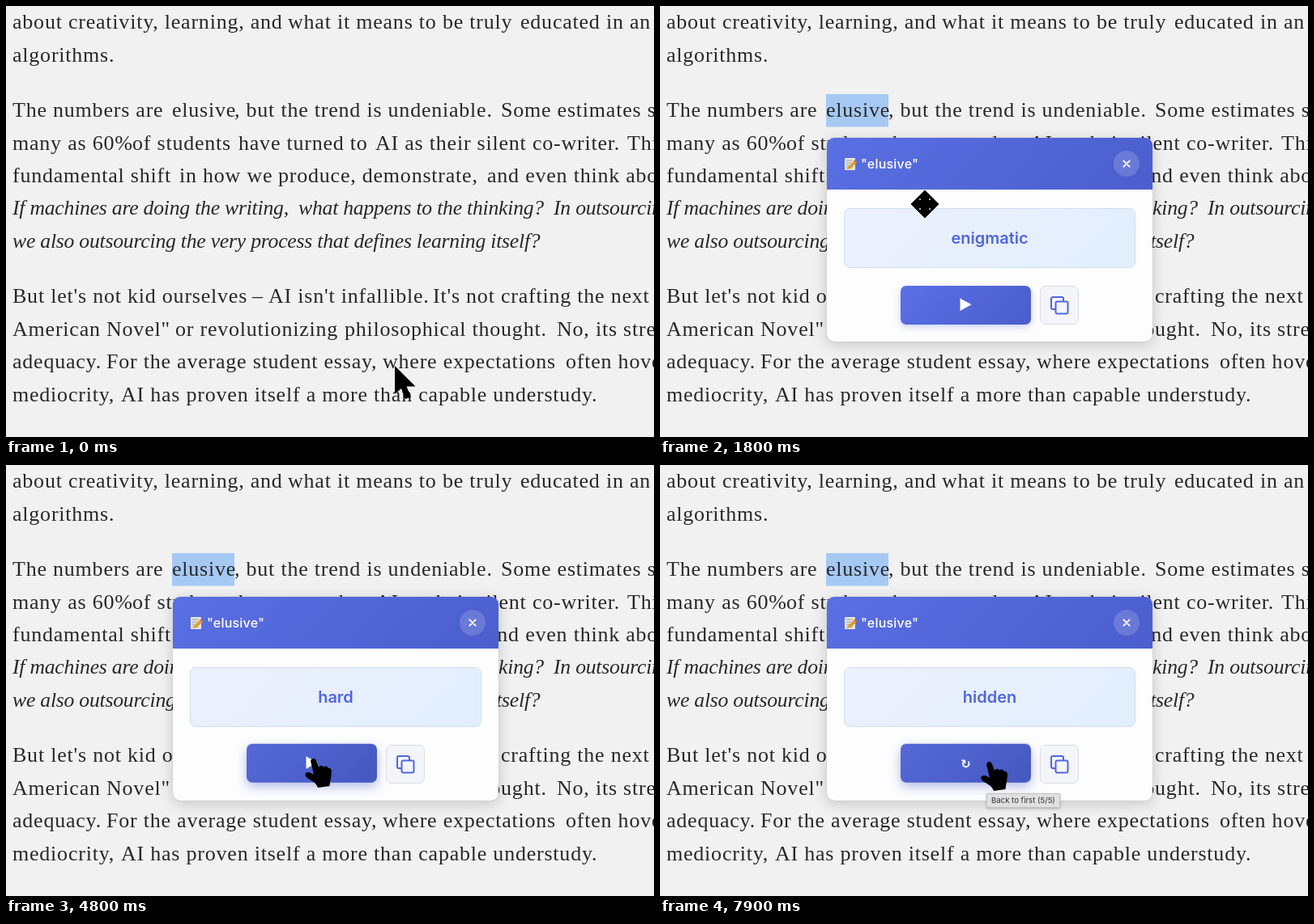
An HTML page for the animation above (8000 ms loop, 800 by 533 pixels).

```html
<!DOCTYPE html>
<html lang="en">
<head>
<meta charset="utf-8">
<title>Word helper</title>
<style>
  html, body { margin: 0; width: 100%; height: 100%; overflow: hidden; background: #f1f1f1; }
  .stage { position: relative; width: 800px; height: 533px; overflow: hidden; }
  .stage *, .stage *::before { animation: 8s step-end -20ms infinite; box-sizing: border-box; }
  .stage div, .stage svg { position: absolute; }

  /* Article */
  .page { left: 0; top: 0; font: 26px "Liberation Serif", "Times New Roman", serif;
    letter-spacing: .78px; fill: #282828; }
  .page .it { font-style: italic; font-size: 25.7px; letter-spacing: -.23px; }
  .mark { fill: #a6c9f4; animation-name: mark; }
  @keyframes mark { 0% { opacity: 0 } 10%, 100% { opacity: 1 } }

  /* Popup */
  .pop { left: 206px; top: 163px; width: 402px; height: 252px; border-radius: 9px; background: #fdfdfd;
    box-shadow: 0 0 1px rgba(0,0,0,.4), 0 4px 18px rgba(0,0,0,.18);
    font-family: Inter, "Liberation Sans", sans-serif; animation-name: pop; }
  @keyframes pop {
    0% { opacity: 0; transform: translateY(12px) }
    11.25% { opacity: .25; transform: translateY(9px) }
    12.5% { opacity: .65; transform: translateY(5px) }
    13.75% { opacity: .92; transform: translateY(1px) }
    15%, 100% { opacity: 1; transform: none }
  }
  .head { left: 0; top: 0; width: 402px; height: 64px; border-radius: 9px 9px 0 0;
    background: linear-gradient(135deg, #596fe3, #4c5ecd); }
  .title { left: 42px; top: 20px; font: 500 16px/24px Inter, "Liberation Sans", sans-serif;
    letter-spacing: .2px; color: #fff; white-space: nowrap; }
  .note { left: 21px; top: 24px; }
  .close { left: 354px; top: 16px; width: 32px; height: 32px; border-radius: 50%; background: rgba(255,255,255,.16); }
  .result { left: 21px; top: 87px; width: 360px; height: 74px; border: 1px solid #cfdef3; border-radius: 7px;
    background: linear-gradient(135deg, #ecf0fd, #e2eefc); overflow: hidden; }
  .words { left: 0; top: 0; width: 358px; text-align: center; color: #5166dc;
    font: 600 20px/72px Inter, "Liberation Sans", sans-serif; animation-name: words; }
  .words p { margin: 0; height: 72px; }
  @keyframes words {
    0% { transform: none }
    37.5% { transform: translateY(-72px) }
    58.75% { transform: translateY(-144px) }
    73.75% { transform: translateY(-216px) }
    82.5%, 100% { transform: translateY(-288px) }
  }

  /* Buttons */
  .go { left: 91px; top: 183px; width: 161px; height: 48px; animation-name: lift; }
  .go::before { content: ""; position: absolute; inset: 0; border-radius: 7px;
    background: linear-gradient(135deg, #5a70e5, #4b5dcc);
    box-shadow: 0 3px 8px rgba(84,104,220,.28); animation-name: glow; }
  @keyframes lift { 0% { transform: none } 25%, 100% { transform: translateY(-1.3px) } }
  @keyframes glow {
    0% { filter: none }
    25%, 100% { filter: brightness(.94); box-shadow: 0 5px 14px rgba(84,104,220,.42) }
  }
  .play { left: 73px; top: 15px; animation-name: play; }
  .again { left: 0; top: 1px; width: 161px; text-align: center; color: #fff;
    font: bold 15px/48px "DejaVu Sans", sans-serif; animation-name: again; }
  @keyframes play { 0% { opacity: 1 } 82.5%, 100% { opacity: 0 } }
  @keyframes again { 0% { opacity: 0 } 82.5%, 100% { opacity: 1 } }
  .copy { left: 263px; top: 183px; width: 48px; height: 48px; border: 1px solid #dadce3;
    border-radius: 7px; background: #f4f5f9; }

  /* Tooltips */
  .tip { height: 18px; padding: 0 5px; border: 1px solid #c4c4c4; background: #e0e0e0; color: #333;
    font: 9.6px/16px Inter, "Liberation Sans", sans-serif; white-space: nowrap;
    box-shadow: 0 1px 3px rgba(0,0,0,.25); }
  .t2, .t3 { left: 376px; top: 402px; }
  .t2 { animation-name: t2; }
  .t3 { animation-name: t3; }
  .t5 { left: 403px; top: 406px; animation-name: t5; }
  @keyframes t2 { 0% { opacity: 0 } 47.5% { opacity: 1 } 58.75%, 100% { opacity: 0 } }
  @keyframes t3 { 0% { opacity: 0 } 68.75% { opacity: 1 } 73.75%, 100% { opacity: 0 } }
  @keyframes t5 { 0% { opacity: 0 } 88.75%, 100% { opacity: 1 } }

  /* Pointer */
  .stage .pointer { left: 0; top: 0; overflow: visible; animation-name: travel; }
  @keyframes travel {
    0% { transform: translate(480px, 445px); animation-timing-function: steps(5) }
    6.25%, 20% { transform: translate(258px, 132px) }
    21.25% { transform: translate(288px, 190px) }
    22.5% { transform: translate(327px, 245px) }
    23.75% { transform: translate(342px, 300px) }
    25% { transform: translate(346px, 336px) }
    26.25% { transform: translate(350px, 352px) }
    33.75% { transform: translate(350px, 352px); animation-timing-function: steps(3) }
    37.5% { transform: translate(369px, 363px) }
    80% { transform: translate(369px, 363px); animation-timing-function: steps(4) }
    85%, 100% { transform: translate(396px, 367px) }
  }
  .arrow { animation-name: arrow; }
  .move { animation-name: move; }
  .hand { animation-name: hand; }
  @keyframes arrow { 0% { opacity: 1 } 21.25%, 100% { opacity: 0 } }
  @keyframes move { 0% { opacity: 0 } 21.25% { opacity: 1 } 25%, 100% { opacity: 0 } }
  @keyframes hand { 0% { opacity: 0 } 25%, 100% { opacity: 1 } }
</style>
</head>
<body>
<div class="stage">
  <svg class="page" width="800" height="533">
    <rect class="mark" x="205" y="109" width="77" height="40.5"/>
    <text y="28"><tspan x="8">about creativity, learning, and</tspan> <tspan x="348">what it means to be truly</tspan> <tspan x="635">educated in an</tspan></text>
    <text y="69" x="8">algorithms.</text>
    <text y="137"><tspan x="8">The numbers are</tspan> <tspan x="205">elusive</tspan><tspan x="282">, but the trend is undeniable.</tspan> <tspan x="611">Some estimates suggest</tspan></text>
    <text y="178"><tspan x="8">many as 60%</tspan> <tspan x="156">of students</tspan> <tspan x="287">have turned to</tspan> <tspan x="456">AI as their silent</tspan> <tspan x="650">co-writer.</tspan> <tspan x="767">This</tspan></text>
    <text y="218"><tspan x="8">fundamental shift</tspan> <tspan x="214">in how we</tspan> <tspan x="336">produce, demonstrate,</tspan> <tspan x="594">and even think about</tspan></text>
    <text class="it" y="258"><tspan x="8">If machines are doing the writing,</tspan> <tspan x="361">what happens to the thinking?</tspan> <tspan x="676">In outsourcing</tspan></text>
    <text class="it" y="299" x="8">we also outsourcing the very process that defines learning itself?</text>
    <text y="367"><tspan x="8">But let's not kid ourselves</tspan> <tspan x="304">–</tspan> <tspan x="324">AI isn't infallible.</tspan> <tspan x="527">It's not crafting the next</tspan></text>
    <text y="408"><tspan x="8">American Novel"</tspan> <tspan x="209">or revolutionizing</tspan> <tspan x="418">philosophical thought.</tspan> <tspan x="680">No, its strength</tspan></text>
    <text y="448"><tspan x="8">adequacy.</tspan> <tspan x="124">For the average student essay,</tspan> <tspan x="465">where expectations</tspan> <tspan x="691">often hover</tspan></text>
    <text y="489"><tspan x="8">mediocrity,</tspan> <tspan x="142">AI has proven itself a more than capable understudy.</tspan></text>
  </svg>

  <div class="pop">
    <div class="head">
      <svg class="note" width="17" height="17">
        <rect x="1" y="1" width="13" height="15" rx="1" fill="#e9e6dc"/>
        <path d="M3 4h8M3 7h6M3 10h4M3 13h8" stroke="#9a9a9a"/>
        <path d="M5 12 13 4l3 3-8 7-4 1z" fill="#d9a02f"/>
        <path d="m13 4 3 3" stroke="#c96a58" stroke-width="2"/>
      </svg>
      <div class="title">"elusive"</div>
      <div class="close">
        <svg width="32" height="32"><path d="m12.3 12.3 7.4 7.4m0-7.4-7.4 7.4" stroke="#fff" stroke-width="1.8" stroke-linecap="round"/></svg>
      </div>
    </div>
    <div class="result">
      <div class="words"><p>enigmatic</p><p>difficult</p><p>hard</p><p>unclear</p><p>hidden</p></div>
    </div>
    <div class="go">
      <svg class="play" width="15" height="17"><path d="M.5.5 14.5 8.3.5 16z" fill="#fff"/></svg>
      <div class="again">↻</div>
    </div>
    <div class="copy">
      <svg width="46" height="46" fill="#f4f5f9" stroke="#5166dc" stroke-width="2">
        <rect x="13" y="13" width="15" height="15" rx="2"/>
        <rect x="18.5" y="18.5" width="15" height="15" rx="2"/>
      </svg>
    </div>
  </div>

  <div class="tip t2">Rephrase (2/5)</div>
  <div class="tip t3">Rephrase (3/5)</div>
  <div class="tip t5">Back to first (5/5)</div>

  <svg class="pointer" width="1" height="1">
    <path class="arrow" d="M0 0V35L8 28 13 41 20 38.500 14.500 25.500H25.500z"/>
    <g class="move">
      <path d="M0-17 17 0 0 17-17 0z" stroke="#000" stroke-linejoin="round"/>
      <path d="M-7-6h2M5-6h2M-7 6h2M5 6h2" stroke="#aaa" stroke-width="2"/>
    </g>
    <path class="hand" d="M7 3C8-1 13-1 14 3L17 11C19 8 22 8 23 11 25 9 28 9 28.500 12 31 11 33 13 33 16L32 25C31 28 31 31 30.500 34L16 36C14 30 9 28 3 24-1 21 0 17 4 17 7 17 9 19 11 20z"/>
  </svg>
</div>
</body>
</html>
```
